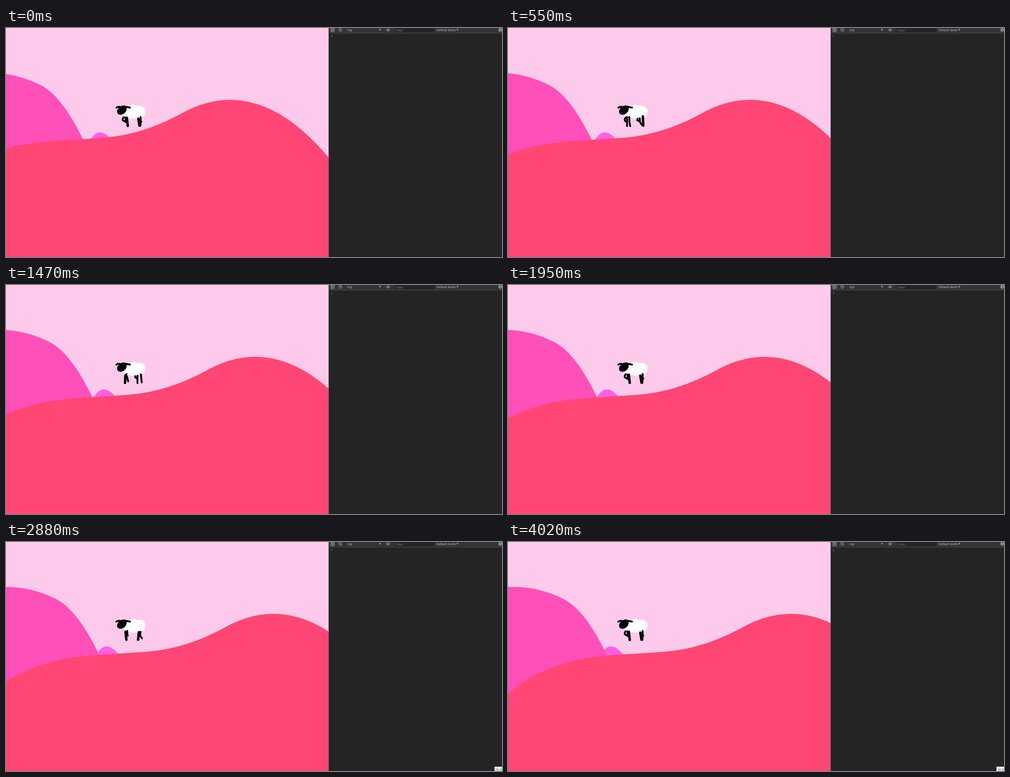
Write an HTML page that moves like this. It is 1098x510 px and loops after 4170 ms.

```html
<!DOCTYPE html>
<html lang="en">
<head>
<meta charset="utf-8">
<title>Walking sheep</title>
<style>
  html, body { margin: 0; width: 100%; height: 100%; overflow: hidden; background: #242424; }
  svg { display: block; }
  text { font-family: "Open Sans", sans-serif; font-size: 6.8px; fill: #c4c7ca; }
  .legs, .ears, .icon { fill: none; stroke: #000; stroke-linecap: round; stroke-linejoin: round; }
  .legs { stroke-width: 4; }
  .thick { stroke-width: 5.4; }
  .ears { stroke-width: 4; }
  .icon { stroke: #a5a8ab; stroke-width: 1; }
</style>
</head>
<body>
<svg width="1098" height="510" viewBox="0 0 1098 510">
  <rect width="714" height="510" fill="#fdcaeb"/>
  <path id="far" fill="#ff5fe3"/>
  <path id="mid" fill="#ff4fb9"/>
  <path id="near" fill="#ff4674"/>

  <g id="sheep">
    <path fill="#fff" d="M262 180C262 175 268 174 273 174C276 170 288 170 290 173.5C296 172 302 174 303.5 176.500C309.500 178 310.500 188 307 193C306 198 300 201 294 200C288 203 278 202 274 200.500C268 202 262 199 261 193Z"/>
    <ellipse cx="256.500" cy="183.300" rx="11.800" ry="8.700" transform="rotate(-39 256.500 183.300)"/>
    <ellipse cx="260.500" cy="175" rx="6" ry="2.600"/>
    <path class="ears" d="M244.300 177.500Q247.500 175 252.500 175.800M266 175.800L274.500 177.200"/>
    <g class="legs" data-pose="0">
      <path d="M260 199Q256 205 261 207L266 210M264 199L266 210M298 198L298 209"/>
      <path class="thick" d="M267.500 200L269.500 218M293 202L295.500 217.500"/>
      <path d="M298 209L297.500 218M299.500 208.500h.1"/>
    </g>
    <g class="legs" data-pose="1">
      <path d="M268.500 198L268.500 208.500M269.500 208.500h.1M298 200L296.500 208L301 214.500"/>
      <path class="thick" d="M264.500 200L266.500 217.500M294 201L292.500 217.500"/>
    </g>
    <g class="legs" data-pose="2">
      <path d="M263.500 198L263.500 218.500M261 199.500Q256 204 260 208L264 207.500M268.500 198Q268 208 270.500 218.500"/>
      <path d="M287 202L286 205.500L292 208.500L294 213L298 217M291.500 201L292 208"/>
      <path class="thick" d="M298.500 197L299.500 217.500"/>
    </g>
    <g class="legs" data-pose="3">
      <path d="M267 198L263.500 206M267.500 203L270.500 214.500"/>
      <path class="thick" d="M264.500 201L263.500 218"/>
      <path d="M286 203Q286 208 291.500 208M291 202L291 218.500M298.500 199L300.500 217"/>
    </g>
  </g>

  <g id="panel">
    <rect x="714" width="384" height="510" fill="#242424"/>
    <rect x="714" width="384" height="11" fill="#333"/>
    <rect x="714" y="11" width="384" height="1" fill="#4a4c50"/>
    <rect x="714" width="1" height="510" fill="#4a4c50"/>
    <g class="icon">
      <path d="M719.500 .5h7.500v7.500h-7.500zM721.500 .5v7.500"/>
      <path fill="#a5a8ab" stroke="none" d="M723 2l3.200 2.200l-3.200 2.200z"/>
      <circle cx="740" cy="4.200" r="3.400"/>
      <path d="M737.700 1.900l4.600 4.600"/>
      <path d="M841.500 4.300Q846 -1 850.500 4.300Q846 9.500 841.500 4.300z"/>
      <circle cx="846" cy="4.300" r="1.100"/>
      <circle cx="1094" cy="4.200" r="2.400" stroke-width="1.800"/>
      <circle cx="1094" cy="4.200" r="3.700" stroke-width="1.300" stroke-linecap="butt" stroke-dasharray="1.450"/>
      <path d="M720 16l2 2l-2 2" stroke-width=".8"/>
    </g>
    <g fill="#a5a8ab">
      <path d="M825.500 2.200h4.600l-2.300 4z"/>
      <path d="M997 2.200h4.600l-2.300 4z"/>
    </g>
    <rect x="861" width="87" height="10" fill="#242424"/>
    <text x="756" y="7">top</text>
    <text x="863" y="7.500" style="fill:#85888b">Filter</text>
    <text x="953" y="7">Default levels</text>
    <g id="tip">
      <rect x="1081.500" y="500.500" width="20" height="12" fill="#fff" stroke="#999"/>
      <text x="1084.500" y="510.500" style="font:7.600px 'Noto Sans CJK KR','Noto Sans CJK',sans-serif;fill:#444">정지</text>
    </g>
  </g>
</svg>
<script>
  const LOOP = 4170;
  const TIP_AT = 2210;
  const STRIDE = 14.45; // near-hill travel per eight gait frames
  const $ = id => document.getElementById(id);

  // Quick start, a pause, then an even beat.
  const stepAt = t => t < 1160
    ? Math.min(4, Math.floor((t + 70) / 154))
    : 5 + Math.floor((t - 1160) / 150);

  // [step, near-hill travel]; straight lines in between.
  const travelKeys = [[0, 0], [4, 40], [5, 44.6], [10, 72], [16, 96], [24, 130.4]];
  function travelAt(step) {
    const i = Math.max(1, travelKeys.findIndex(([s]) => s >= step));
    const [s0, d0] = travelKeys[i - 1];
    const [s1, d1] = travelKeys[i];
    return d0 + (d1 - d0) * (step - s0) / (s1 - s0);
  }

  // The gait repeats its outline every half cycle of eight.
  const poseAt = travel => Math.floor(travel * 8 / STRIDE + 0.28) % 4;

  // Parabolic ridge through [x, slope] knots, closed along the bottom.
  function ridge(y, knots) {
    let [x, slope] = knots[0];
    let d = `M${x} 520V${y}`;
    for (const [nx, next] of knots.slice(1)) {
      const half = (nx - x) / 2;
      const cy = y + slope * half;
      y = cy + next * half;
      d += `Q${x + half} ${cy} ${nx} ${y}`;
      [x, slope] = [nx, next];
    }
    return d + 'V520Z';
  }

  const hills = [
    { el: $('far'), speed: 0.15, d: ridge(255.5, [[180, -1.15], [192, -1.15], [208, 0], [226, 0.92], [240, 1.15]]) },
    { el: $('mid'), speed: 0.357, d: ridge(101.6, [[-60, -0.122], [75, 0.486], [172, 2.09], [190, 2.1]]) },
    { el: $('near'), speed: 1, d: ridge(348.7, [[-140, -1.01], [-72, -0.51], [0, -0.29], [39, -0.16],
      [130, -0.05], [217.5, -0.08], [390, -0.555], [574.5, 0.411], [720, 1.23]]) }
  ];
  hills.forEach(h => h.el.setAttribute('d', h.d));

  const legs = document.querySelectorAll('[data-pose]');
  const show = (el, on) => { el.style.display = on ? '' : 'none'; };

  const start = performance.now();
  function tick() {
    const t = (performance.now() - start) % LOOP;
    const travel = travelAt(Math.min(24, stepAt(t)));
    const pose = poseAt(travel);
    for (const h of hills) h.el.setAttribute('transform', `translate(${travel * h.speed})`);
    legs.forEach(g => show(g, +g.dataset.pose === pose));
    show($('tip'), t >= TIP_AT);
    requestAnimationFrame(tick);
  }
  tick();
</script>
</body>
</html>
```
